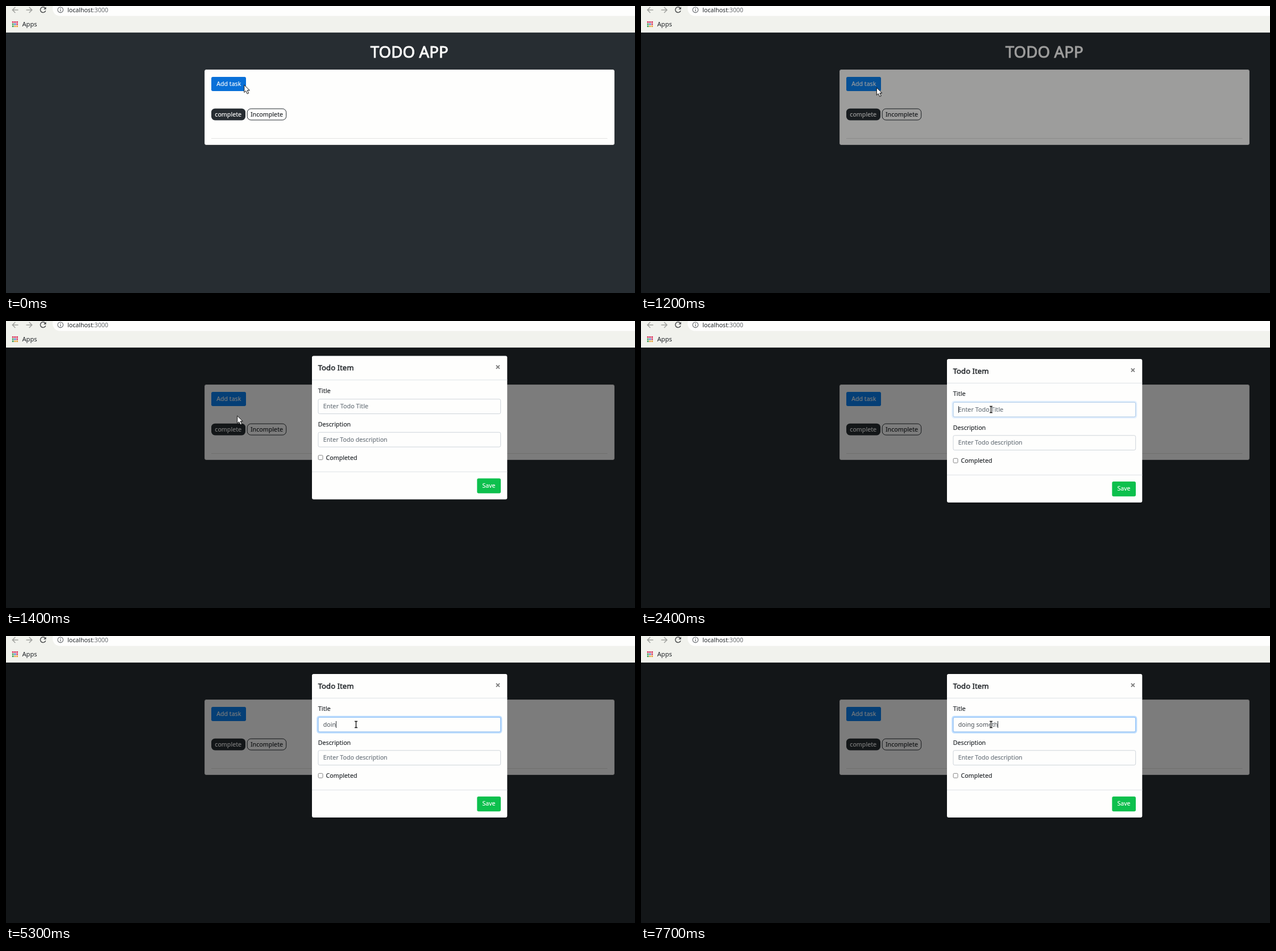
An HTML page that plays this animation: 1106x506 px, repeating every 8 s.

```html
<!DOCTYPE html>
<html lang="en">
<head>
<meta charset="utf-8">
<title>Todo app</title>
<style>
  html, body { margin: 0; width: 100%; height: 100%; overflow: hidden; background: #272d32; }
  svg { display: block; font: 10.7px "Noto Sans", "Open Sans", sans-serif; }
  text { white-space: pre; fill: #212529; stroke: #212529; stroke-width: .15; }
  text.white { stroke: #fefefd; }
  text.hint { stroke: #6c757d; }
  text.plain { stroke: none; }
  text.heading { stroke-width: .9; }
  text.strong { stroke-width: .45; }
  .white { fill: #fefefd; }
  .hint { fill: #6c757d; }
  .mid { text-anchor: middle; }
  .field { fill: #fefefd; stroke: #ced4da; }
  .rule { stroke: #dee2e6; }
  .icon { fill: none; stroke-width: 1.5; }
</style>
</head>
<body>
<svg width="1106" height="506" viewBox="0 0 1106 506">
  <!-- page -->
  <rect width="1106" height="506" fill="#272d32"/>
  <text class="white heading mid" x="709.3" y="90.5" font-size="27.8">TODO APP</text>
  <rect class="white" x="349.5" y="112.5" width="720" height="132" rx="2.5" stroke="#dfdfdf"/>
  <rect id="add" x="361" y="125" width="61" height="25" rx="2.7"/>
  <text class="white mid" x="391.8" y="141" font-size="10.6">Add task</text>
  <rect x="361" y="180.7" width="60" height="20.8" rx="6.5" fill="#272d32"/>
  <text class="white mid" x="390.7" y="195">complete</text>
  <rect x="424.2" y="181.2" width="68.5" height="19.8" rx="6.5" fill="none" stroke="#272d32"/>
  <text class="mid" x="458.5" y="195">Incomplete</text>
  <path d="M361 233.5H1057.5" stroke="#e3e3e2"/>
  <rect id="shade" y="47" width="1106" height="459"/>

  <!-- browser bar -->
  <rect width="1106" height="46" fill="#f1f2ed"/>
  <rect y="46" width="1106" height="1" fill="#c8cac8"/>
  <rect class="white" x="82" y="-9" width="1060" height="26.5" rx="13"/>
  <g class="icon">
    <path d="M21.5 7H11.5M16.3 2L11.3 7L16.3 12M35.5 7H45.5M40.7 2L45.7 7L40.7 12" stroke="#a1a29f"/>
    <path d="M69 3.7A4.8 4.8 0 1 0 69.7 8.3" stroke="#4c4e50"/>
    <circle cx="95.7" cy="6.8" r="4.8" stroke="#5f6368" stroke-width="1.1"/>
    <path d="M95.7 6.2V9.5M95.7 4V5.2" stroke="#5f6368" stroke-width="1.2"/>
  </g>
  <path d="M70.5 1.5V6H66Z" fill="#4c4e50"/>
  <text class="plain" x="108" y="10.6" font-size="10.6">localhost<tspan fill="#686c70">:3000</tspan></text>
  <g id="apps"></g>
  <text class="plain" x="28.4" y="36" font-size="11.2">Apps</text>

  <!-- dialog -->
  <g id="dialog">
    <rect class="white" x="538" y="67" width="343.3" height="253" rx="3"/>
    <text class="strong" x="548.7" y="93" font-size="13.2">Todo Item</text>
    <path d="M861.9 83.6l6 6m0-6l-6 6" stroke="#7d7d7d" stroke-width="1.9"/>
    <path class="rule" d="M538 109.5H881.3M538 271.5H881.3"/>
    <text x="548.7" y="132.3" font-size="11.1">Title</text>
    <rect class="focus" x="547.6" y="142" width="323.4" height="28.5" rx="3.5" fill="none" stroke="#bfdeff" stroke-width="2.6"/>
    <rect class="field" x="549" y="143.3" width="320.7" height="25.8" rx="2.5"/>
    <rect class="focus" x="549" y="143.3" width="320.7" height="25.8" rx="2.5" fill="none" stroke="#80bdff"/>
    <text id="hint" class="hint" x="557.8" y="160" font-size="10.8">Enter Todo Title</text>
    <text id="typed" class="plain" x="557.8" y="160" font-size="10.65" style="fill:#495057"></text>
    <rect id="caret" y="150" width="1" height="12" fill="#30353a"/>
    <text x="548.7" y="191.5">Description</text>
    <rect class="field" x="549" y="201.8" width="320.7" height="25.8" rx="2.5"/>
    <text class="hint" x="557.8" y="218.2" font-size="10.65">Enter Todo description</text>
    <rect x="549.2" y="242.3" width="7.8" height="7.8" rx="1.4" fill="#fff" stroke="#767676" stroke-width=".9"/>
    <text x="562.5" y="250.2">Completed</text>
    <rect x="828.3" y="283" width="41.7" height="26.2" rx="2.7" fill="#0dc04d"/>
    <text class="white mid" x="849" y="299.3" font-size="10.5">Save</text>
  </g>

  <path id="arrow" d="M0 0V13.2L3 10.5L5.4 15.6L7.9 14.5L5.5 9.5H9.6Z" fill="#fff" stroke="#111"/>
  <g id="beam" fill="none">
    <path d="M-2.5 -5.5H2.5M0 -5.5V5.5M-2.5 5.5H2.5" stroke="#fff" stroke-width="2.8"/>
    <path d="M-2.5 -5.5H2.5M0 -5.5V5.5M-2.5 5.5H2.5" stroke="#1a1a1a" stroke-width="1.4"/>
  </g>
</svg>
<script>
const LOOP = 8000, STEP = 100;
const CLICK_ADD = 1082, OPEN = 1200, OVER_FIELD = 1900, CLICK_FIELD = 2300;
const PHRASE = "doing someth";
const KEY_TIMES = [4100, 4100, 5000, 5300, 5600, 6000, 6400, 6600, 6700, 7100, 7600, 7700];

// Pointer stops, joined by straight moves.
const STOPS = [
  { t: 0, x: 418.8, y: 139.2 }, { t: 500, x: 407, y: 137 }, { t: 1100, x: 407, y: 137 },
  { t: 1200, x: 414.3, y: 144 }, { t: 1400, x: 406.7, y: 167.2 },
  { t: 1700, x: 681.3, y: 127.5 }, { t: 2100, x: 615.5, y: 156 }
];

const $ = id => document.getElementById(id);
const ramp = (t, start, length) => Math.min(1, Math.max(0, (t - start) / length));
const show = (node, opacity) => node.setAttribute("opacity", Number(opacity));
const move = (node, x, y) => node.setAttribute("transform", `translate(${x} ${y})`);

const dotRows = [["#d8315b", "#d8315b", "#d8315b"], ["#3b9b50", "#3f7fd6", "#d8315b"], ["#3b9b50", "#e8a33a", "#e8a33a"]];
$("apps").innerHTML = dotRows.flatMap((row, r) => row.map((color, c) =>
  `<rect x="${10.8 + c * 3.7}" y="${27 + r * 3.7}" width="2.7" height="2.7" fill="${color}"/>`)).join("");

function pointerAt(t) {
  const next = STOPS.findIndex(stop => stop.t > t);
  if (next < 0) return STOPS.at(-1);
  const a = STOPS[next - 1], b = STOPS[next], k = ramp(t, a.t, b.t - a.t);
  return { x: a.x + (b.x - a.x) * k, y: a.y + (b.y - a.y) * k };
}

function drawField(t) {
  const focus = ramp(t, CLICK_FIELD + 20, 180);
  document.querySelectorAll(".focus").forEach(node => show(node, focus));

  const pressed = KEY_TIMES.filter(time => time <= t);
  const typed = $("typed"), text = PHRASE.slice(0, pressed.length);
  if (typed.textContent !== text) typed.textContent = text;
  show($("hint"), !text);

  // The caret restarts its blink on each key.
  const idle = t - (pressed.at(-1) ?? CLICK_FIELD);
  show($("caret"), idle >= 0 && idle % 1600 < 600);
  $("caret").setAttribute("x", Math.floor(558 + (text ? typed.getComputedTextLength() : 0)));
}

function draw(t) {
  $("add").setAttribute("fill", t < CLICK_ADD ? "#0970d8" : "#0a82f2");
  show($("shade"), .51 * ramp(t, CLICK_ADD, 157));

  show($("dialog"), ramp(t, OPEN, 150));
  move($("dialog"), 0, -34 * (1 - ramp(t, OPEN, 300)) ** 1.65);
  drawField(t);

  const { x, y } = pointerAt(t), overField = t >= OVER_FIELD;
  for (const node of [$("arrow"), $("beam")]) move(node, x, y);
  show($("arrow"), !overField);
  show($("beam"), overField);
}

const origin = performance.now();
function tick() {
  const t = (performance.now() - origin) % LOOP;
  draw(Math.floor(t / STEP) * STEP);
  requestAnimationFrame(tick);
}
tick();
</script>
</body>
</html>
```
